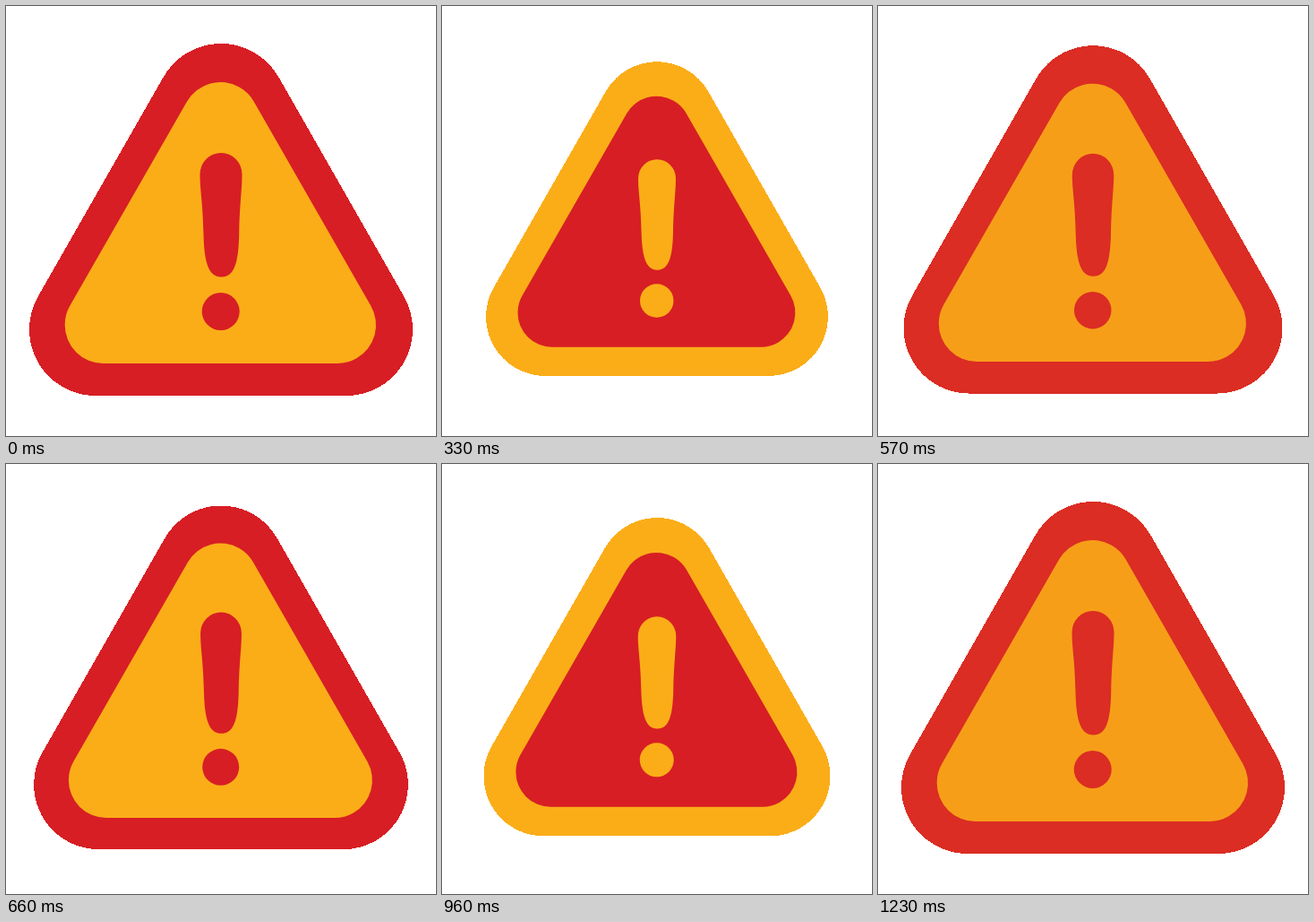
Recreate the animation shown at these times as an HTML page. Size 480 by 480 pixels, loop 1.26 s.

```html
<!DOCTYPE html>
<html lang="en">
<head>
<meta charset="utf-8">
<title>Warning sign</title>
<style>
  html, body { margin: 0; height: 100%; overflow: hidden; background: #fff; }
  svg { display: block; width: 100vw; height: 100vh; }
  .rim { fill: var(--a); stroke: var(--a); stroke-width: 148; shape-rendering: crispEdges; }
  .face { fill: var(--b); stroke: var(--b); stroke-width: 86; }
  .mark { fill: var(--a); }
</style>
</head>
<body>
<svg viewBox="0 0 480 480" stroke-linejoin="round">
  <g id="sign">
    <path class="rim" d="M240 116 380 361H100Z"/>
    <path class="face" d="M239.4 128 370 356H108.7Z"/>
    <path class="mark" d="M216.5 188a23.5 24 0 0 1 47 0C263.5 206 261 218 260.2 255C259.5 286 255 302.5 240.5 302.5S221.3 286 220.5 255C219.7 218 216.5 206 216.5 188Z"/>
    <circle class="mark" cx="239.7" cy="341" r="21"/>
  </g>
</svg>
<script>
const STEP = 30, STEPS = 42;
const RED = [215, 30, 36], YELLOW = [251, 173, 24];
const sign = document.getElementById('sign');

const mix = (from, to, k) => `rgb(${from.map((v, i) => Math.round(v + (to[i] - v) * k))})`;
const smooth = u => u * u * (3 - 2 * u);

// Linear pulse 100% -> 88% -> 100%, twice, then a short rest.
function scaleAt(n) {
  const phase = Math.min(n, 40) % 20;
  return 1 - 0.012 * (10 - Math.abs(phase - 10));
}

// Eased colour swaps, each taking 11 steps, in alternating direction.
function swapAt(n) {
  const k = smooth((n % 11) / 10);
  return Math.floor(n / 11) % 2 ? 1 - k : k;
}

function draw(now) {
  const n = Math.floor(now / STEP) % STEPS;
  const swap = swapAt(n);
  sign.setAttribute('transform', `translate(240 230) scale(${scaleAt(n)}) translate(-240 -230)`);
  sign.style.setProperty('--a', mix(RED, YELLOW, swap));
  sign.style.setProperty('--b', mix(YELLOW, RED, swap));
}

function tick() {
  draw(performance.now());
  requestAnimationFrame(tick);
}
tick();
</script>
</body>
</html>
```
